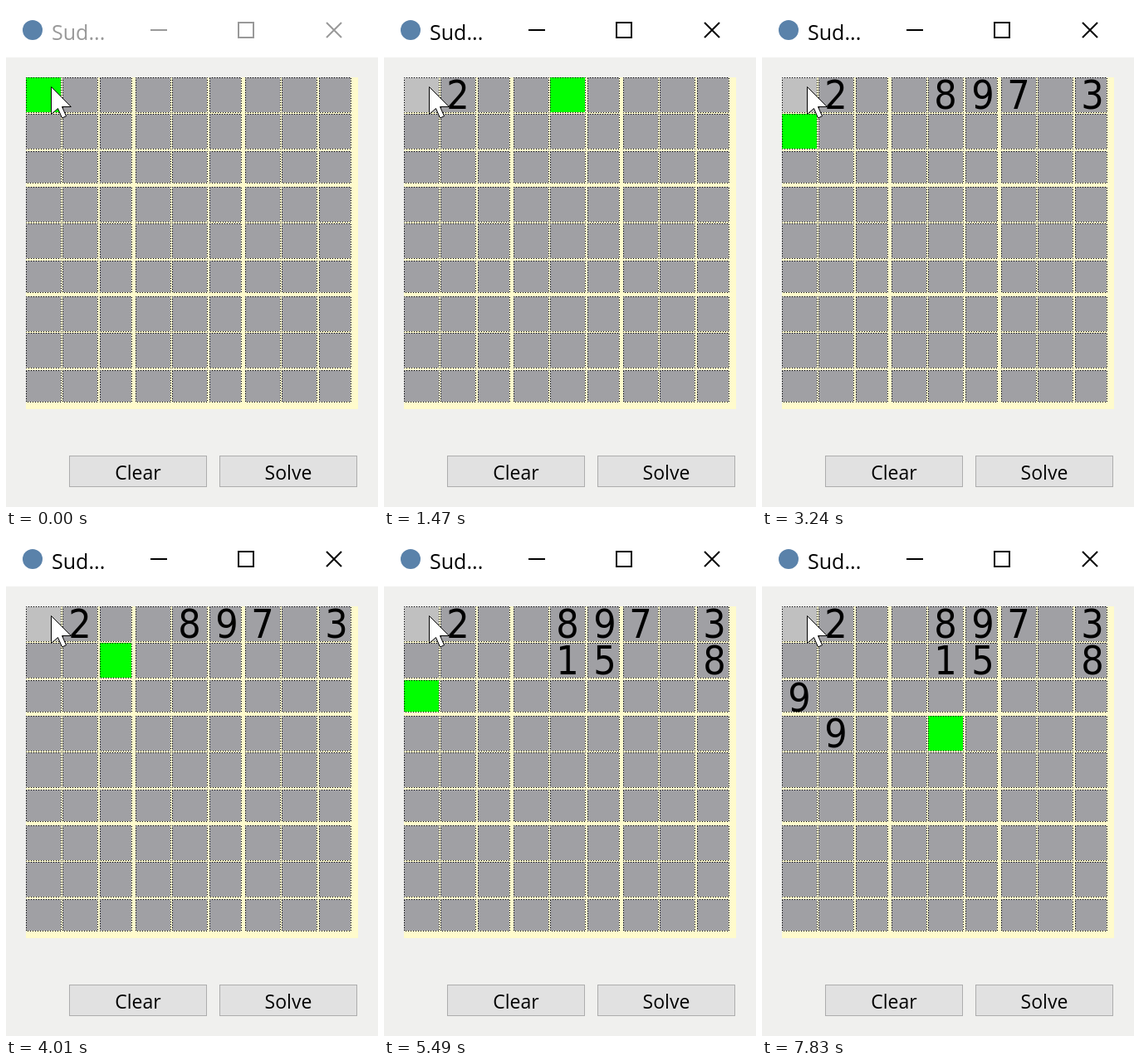
An HTML page for the animation above (8000 ms loop, 448x604 px).

```html
<!DOCTYPE html>
<html lang="en">
<head>
<meta charset="utf-8">
<title>Sudoku entry</title>
<style>
html, body { margin: 0; width: 100%; height: 100%; overflow: hidden; background: #f0f0ee; }
svg { display: block; width: 100vw; height: 100vh; }
text { font-family: "Open Sans", "Noto Sans", sans-serif; }
.bar text { font-size: 25px; fill: var(--ink); }
.bar path { fill: none; stroke: var(--ink); stroke-width: 2; }
.btn { fill: #e1e1e1; stroke: #adadad; }
.label { font-size: 23px; text-anchor: middle; }
.digit { font-family: "DejaVu Sans Condensed", "DejaVu Sans", sans-serif; font-stretch: condensed; font-size: 48px; text-anchor: middle; }
.dots { fill: none; stroke: #000; stroke-dasharray: 1 2; stroke-dashoffset: .5; }
</style>
</head>
<body>
<svg viewBox="0 0 448 604">
  <rect width="448" height="604" fill="#f0f0ee"/>
  <g class="bar" id="bar">
    <rect width="448" height="62" fill="#fff"/>
    <circle cx="32" cy="29" r="12" fill="#5a82aa"/>
    <text x="55" y="41">Sud...</text>
    <path d="M174 29H194M280 20H298V38H280Z"/>
    <path d="M386 20L404 38M404 20L386 38"/>
  </g>
  <rect x="24" y="86" width="400" height="400" fill="#fffbcc"/>
  <g id="grid"></g>
  <rect class="btn" x="76.5" y="542.5" width="165" height="37"/>
  <text class="label" x="159" y="571">Clear</text>
  <rect class="btn" x="257.5" y="542.5" width="165" height="37"/>
  <text class="label" x="340" y="571">Solve</text>
  <path d="M54.5 97.5v33l8 -7 5 11.5 5 -2.2 -5 -11.3h10.8z" fill="#fff" stroke="#000"/>
</svg>
<script>
const LOOP = 8000, FOCUS_AT = 300;
const GREY = '#a0a0a4', HOVER = '#c0c0c0', GREEN = '#00ff00';

// Each key fills or skips (.) a cell and steps on; v steps one row down.
const keys = '.2..897.3....15..89v9..';
const times = [850, 920, 1150, 1470, 1860, 1940, 2550, 2780, 3240, 3840, 4010, 4080,
  4250, 4630, 4710, 4940, 5090, 5490, 5920, 6630, 7220, 7680, 7830];

const bar = document.getElementById('bar');
const grid = document.getElementById('grid');
const start = i => 44 * i + (i % 3 === 2 ? 1 : 0);
const size = i => i % 3 === 2 ? 38 : 42;

function add(name, attrs) {
  const el = document.createElementNS('http://www.w3.org/2000/svg', name);
  for (const key in attrs) el.setAttribute(key, attrs[key]);
  return grid.appendChild(el);
}

const cells = Array.from({ length: 81 }, (_, i) => {
  const col = i % 9, row = Math.floor(i / 9);
  const x = 24 + start(col), y = 86 + start(row);
  const width = size(col), height = size(row);
  const box = add('rect', { x, y, width, height });
  add('rect', { class: 'dots', x: x + .5, y: y + .5, width, height });
  const digit = add('text', { class: 'digit', x: x + 21, y: y + 38 });
  return { box, digit };
});

function draw(t) {
  const values = [];
  let selected = 0;
  for (let k = 0; k < keys.length && times[k] <= t; k++) {
    if (keys[k] > '0' && keys[k] <= '9') values[selected] = keys[k];
    selected += keys[k] === 'v' ? 9 : 1;
  }
  bar.style.setProperty('--ink', t < FOCUS_AT ? '#999' : '#000');
  cells.forEach(({ box, digit }, i) => {
    box.setAttribute('fill', i === selected ? GREEN : i ? GREY : HOVER);
    digit.textContent = values[i] || '';
  });
}

const origin = performance.now();
function tick() {
  draw((performance.now() - origin) % LOOP);
  requestAnimationFrame(tick);
}
tick();
</script>
</body>
</html>
```
